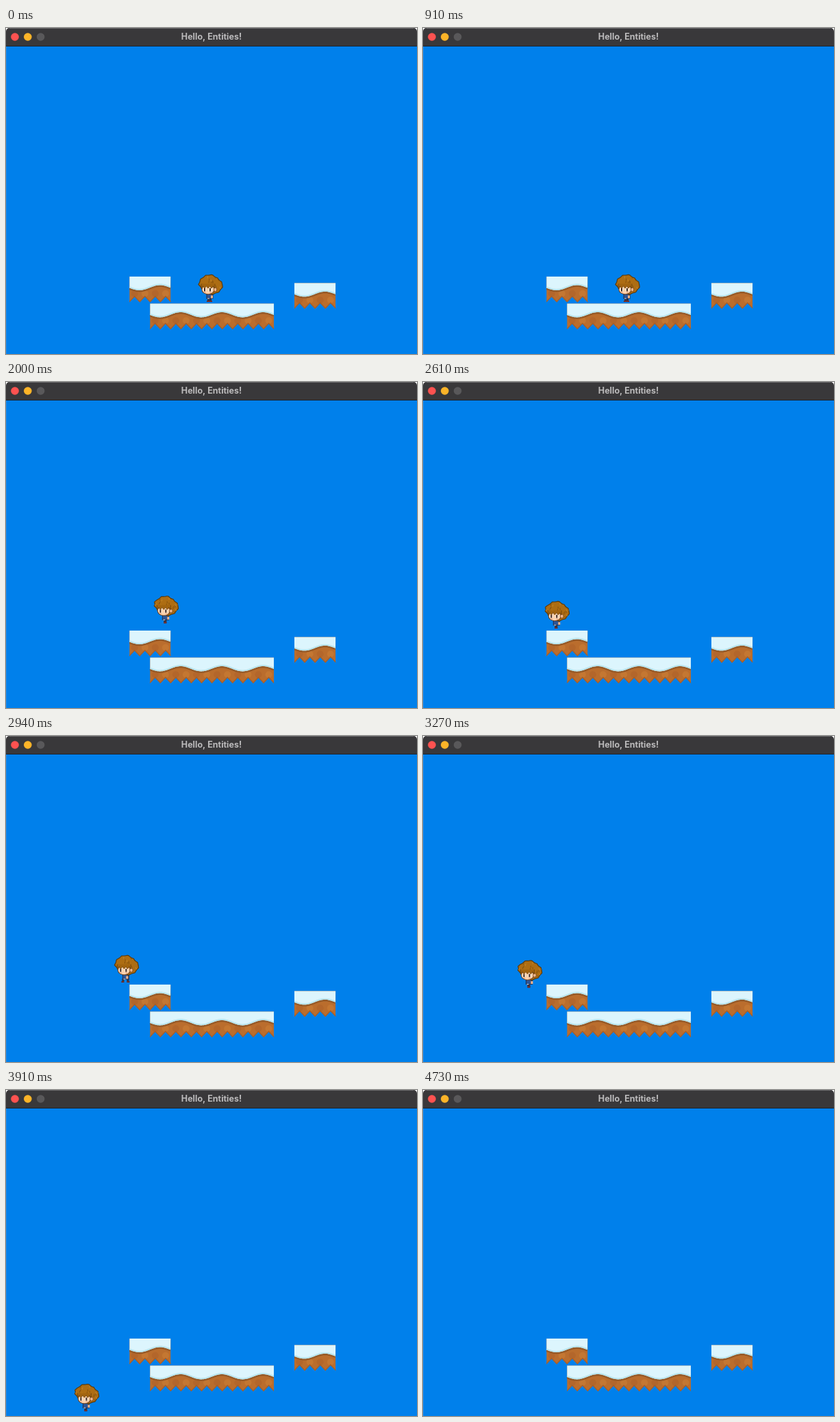
Write an HTML page with a canvas that moves like this. It is 600 px wide and 476 px high and loops after 4760 ms.

```html
<!DOCTYPE html>
<html lang="en">
<head>
<meta charset="utf-8">
<title>Hello, Entities!</title>
<style>
  html, body { margin: 0; width: 100%; height: 100%; overflow: hidden; background: #0080eb; }
  canvas { display: block; }
</style>
</head>
<body>
<canvas id="stage" width="600" height="476"></canvas>
<script>
const c = document.getElementById('stage').getContext('2d');
const LOOP = 4760, STEP = 30, TAU = Math.PI * 2;
const WALK = { start: 910, speed: 0.0604, x: 281, period: 600 };
const GROUND = 359.5, LEDGE = 319.5, GRAVITY = 300;
const JUMP = { start: 1585, speed: 180 };
const FALL_START = 3047;
const TILE = 60.3;

function rect(color, x, y, w, h) {
  c.fillStyle = color;
  c.fillRect(x, y, w, h);
}

function oval(color, x, y, rx, ry = rx) {
  c.fillStyle = color;
  c.beginPath();
  c.ellipse(x, y, rx, ry, 0, 0, TAU);
  c.fill();
}

function stroke(color, width) {
  c.strokeStyle = color;
  c.lineWidth = width;
  c.stroke();
}

function random(seed) {
  return () => (seed = seed * 16807 % 2147483647) / 2147483647;
}

// Adds one line through the points (x, f(x)).
function trace(f, from, to, step = 1) {
  for (let x = from; x <= to + step / 2; x += step) c.lineTo(x, f(x));
}

const snowEdge = x => 16.4 + 3.7 * Math.cos((x - 14.5) * TAU / TILE);
const teeth = x => 29.8 + 8 * Math.abs(1 - (x / TILE * 8) % 2);

function platform(x, y, tiles) {
  const w = tiles * TILE;
  c.save();
  c.translate(x, y);
  c.beginPath();
  trace(teeth, 0, w, TILE / 8);
  c.lineTo(w, 0);
  c.lineTo(0, 0);
  c.clip();
  rect('#ba6d2d', 0, 0, w, 40);
  for (let i = 0; i < tiles * 4; i++) {
    oval(i % 2 ? '#c47732' : '#b3662b', (i + .5) * TILE / 4, 25, 5, 5);
  }
  c.beginPath();
  trace(teeth, 0, w, TILE / 8);
  stroke('#a65d29', 2.5);
  c.beginPath();
  trace(snowEdge, 0, w);
  stroke('#965a28', 5);
  c.lineTo(w, 0);
  c.lineTo(0, 0);
  c.fillStyle = '#dcf5fd';
  c.fill();
  c.beginPath();
  trace(px => snowEdge(px) - 1, 0, w);
  stroke('#b9e5ee', 2);
  c.restore();
}

function hairPath(tufted) {
  c.beginPath();
  for (let a = 0; a < TAU; a += TAU / 72) {
    const lowLeft = Math.max(0, -Math.cos(a) * Math.sin(a));
    const tuft = tufted ? Math.exp(-(((a - 3.5) / .12) ** 2)) : 0;
    const r = 1 - .07 * Math.abs(Math.cos(a * 5.5)) - .3 * lowLeft + .12 * tuft;
    c.lineTo(18 + 18 * r * Math.cos(a), 15 + 14.8 * r * Math.sin(a));
  }
  c.closePath();
}

function drawHair(tufted) {
  const rnd = random(tufted ? 71 : 29);
  hairPath(tufted);
  c.fillStyle = '#ad6d13';
  c.fill();
  stroke('#5a390a', 1.2);
  c.save();
  c.clip();
  for (let i = 0; i < 34; i++) {
    const x = rnd() * 34, y = rnd() * 28;
    c.beginPath();
    c.moveTo(x, y);
    c.lineTo(x + (x - 18) / 9, y + 3);
    stroke(i % 3 ? '#85510d' : '#c58526', 1);
  }
  c.restore();
}

function drawFace() {
  oval('#70401d', 14, 22.5, 9.5, 7.2);
  oval('#fbd2ae', 14, 22.3, 8.6, 6.4);
  for (const x of [8, 16]) {
    rect('#fff4e3', x - 1, 21, 4, 4);
    rect('#42251a', x, 20.5, 2, 4.5);
    rect('#eaa27e', x, 26, 3, 1);
  }
  oval('#814f20', 24.5, 22.5, 2.6, 3.2);
  oval('#efb589', 24.5, 22.5, 1.8, 2.4);
  c.beginPath();
  c.moveTo(4, 14);
  trace(x => 18.5 + 2 * (Math.floor(x / 2.5) % 2 ? 1 : -.6), 4, 24, 2.5);
  c.lineTo(24, 14);
  c.fillStyle = '#a2640f';
  c.fill();
  stroke('#6c420c', .8);
}

function drawBody(step) {
  const stride = Math.round(2 * Math.sin(step * TAU / 4));
  rect('#33313f', 13 - stride, 35, 3, 4);
  rect('#33313f', 16 + stride, 35, 3, 4);
  rect('#6e2d2b', 12 - stride, 38.5, 4, 2);
  rect('#6e2d2b', 16 + stride, 38.5, 4, 2);
  rect('#26314d', 11.5, 28, 10, 8);
  rect('#2c5596', 12.5, 29, 7, 6);
  rect('#f1b38b', 18 - stride / 2, 31, 3, 4);
  rect('#ded9dd', 13, 35, 3, 1);
}

function drawHero(x, y, step, tufted) {
  c.save();
  c.translate(x, y);
  drawBody(step);
  drawHair(tufted);
  drawFace();
  c.restore();
}

function heroY(t) {
  if (t < JUMP.start) return GROUND;
  if (t >= FALL_START) {
    const s = (t - FALL_START) / 1000;
    return LEDGE + GRAVITY * s * s / 2;
  }
  const s = (t - JUMP.start) / 1000;
  const y = GROUND - JUMP.speed * s + GRAVITY * s * s / 2;
  const descending = s > JUMP.speed / GRAVITY;
  return descending ? Math.min(y, LEDGE) : y;
}

function drawWindow() {
  rect('#fff', 0, 0, 600, 27);
  rect('#0080eb', 0, 27, 600, 449);
  c.beginPath();
  c.roundRect(0, 0, 600, 27, [5, 5, 0, 0]);
  c.fillStyle = '#39383a';
  c.fill();
  rect('#69686a', 5, 0, 590, 1);
  rect('#1b2530', 0, 26, 600, 1);
  rect('rgba(80,150,210,.45)', 0, 27, 1, 449);
  ['#fe5250', '#fdb428', '#59585a'].forEach((color, i) => oval(color, 13 + i * 18.8, 13, 5.8));
  c.fillStyle = '#bcbbbc';
  c.font = '700 12.5px Inter, "Open Sans", sans-serif';
  c.textAlign = 'center';
  c.fillText('Hello, Entities!', 300, 17.2);
}

function draw(t) {
  drawWindow();
  platform(180.2, 362.8, 1);
  platform(421, 372.2, 1);
  platform(210.2, 402.3, 3);
  const walked = Math.max(0, t - WALK.start);
  const phase = walked % WALK.period / WALK.period;
  const y = heroY(t);
  if (y < 476) drawHero(WALK.x - walked * WALK.speed, y, Math.floor(phase * 4), phase >= .5);
}

const begin = performance.now();
function tick() {
  const t = (performance.now() - begin) % LOOP;
  draw(Math.floor(t / STEP) * STEP);
  requestAnimationFrame(tick);
}
tick();
</script>
</body>
</html>
```
